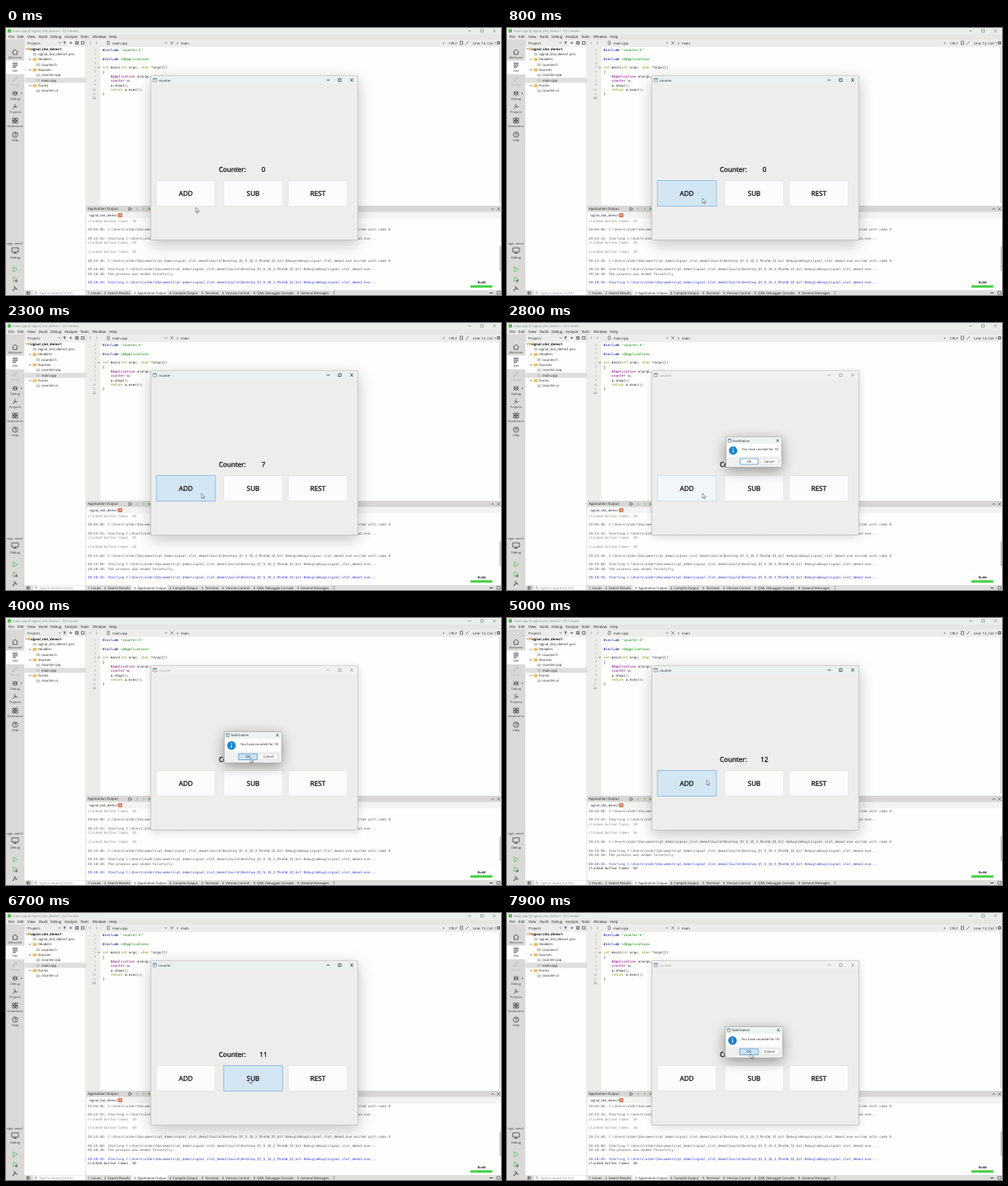
An HTML page with a canvas that plays this animation: 600 px wide and 323 px high, repeating every 8 s.

```html
<!DOCTYPE html>
<html>
<head>
<meta charset="utf-8">
<style>
html, body { margin: 0; width: 100%; height: 100%; overflow: hidden; }
canvas { display: block; }
</style>
</head>
<body>
<canvas id="stage" width="600" height="323"></canvas>
<script>
const g = document.getElementById('stage').getContext('2d');
const LOOP = 8000, LINE = 5.34;
const SANS = '"Open Sans", "Noto Sans", sans-serif';
const MONO = '"DejaVu Sans Mono", monospace';
const PAPER = '#fefefc';
g.textRendering = 'geometricPrecision';
g.lineJoin = 'round';

const clamp = v => Math.max(0, Math.min(1, v));
const smooth = v => v * v * (3 - 2 * v);
const mix = (a, b, k) => `rgb(${a.map((v, i) => Math.round(v + (b[i] - v) * k))})`;
const fade = (t, on, off) => clamp((t - on) / 150) - clamp((t - off) / 150);

function rect(x, y, w, h, fill, stroke) {
  if (fill) { g.fillStyle = fill; g.fillRect(x, y, w, h); }
  if (stroke) { g.lineWidth = .8; g.strokeStyle = stroke; g.strokeRect(x, y, w, h); }
}
// y is the vertical middle of the line of text
function text(s, x, y, size = 4.2, color = '#333', align = 'left', weight = '', family = SANS) {
  g.font = `${weight} ${size}px ${family}`;
  g.fillStyle = color;
  g.textAlign = align;
  g.fillText(s, x, y + size * .34);
}
// Large text with a slightly heavier stem
function label(s, x, y, align) {
  text(s, x, y, 8.1, '#111', align);
  g.strokeStyle = '#111';
  g.lineWidth = .3;
  g.strokeText(s, x, y + 8.1 * .34);
}
const code = (s, x, y, color) => text(s, x, y, 4.07, color, 'left', '', MONO);
function path(d, x, y, stroke, fill, width = .8) {
  g.save();
  g.translate(x, y);
  const p = new Path2D(d);
  if (fill) { g.fillStyle = fill; g.fill(p); }
  if (stroke) { g.strokeStyle = stroke; g.lineWidth = width; g.stroke(p); }
  g.restore();
}
const CROSS = 'M-1.8-1.8L1.8 1.8M1.8-1.8L-1.8 1.8';
const DOWN = 'M-1.2-.6L0 .6L1.2-.6';
const PLAY = 'M-2.2-3L2.8 0L-2.2 3Z';
function windowButtons(xs, y, color) {
  path('M-1.8 0H1.8', xs[0], y, color);
  path('M-1.6-1.6H1.6V1.6H-1.6Z', xs[1], y, color, null, .7);
  path(CROSS, xs[2], y, color, null, .7);
}

const modes = [
  ['Welcome', 29, 'M-3.5 0L0-3L3.5 0M-2.4-.5V3H2.4V-.5'],
  ['Edit', 45, 'M-3-2.5H3M-3-.8H3M-3 .9H3M-3 2.6H1'],
  ['Design', 62, 'M-3 3L-2 0L2-3L3-2L-1 2Z'],
  ['Debug', 79, 'M-1.5-1.5A1.8 1.8 0 0 1 1.5-1.5V1.5A1.8 1.8 0 0 1-1.5 1.5ZM-3.3 0H3.3M-3-2.5L-1.5-1M3-2.5L1.5-1M-3 2.5L-1.5 1M3 2.5L1.5 1'],
  ['Projects', 95, 'M-3 3L1-1M.5-3A2 2 0 1 0 3-.5'],
  ['Extensions', 112, 'M-3-3H-.5V-.5H-3ZM.5-3H3V-.5H.5ZM-3 .5H-.5V3H-3ZM.5 .5H3V3H.5Z'],
  ['Help', 129, 'M3.2 0A3.2 3.2 0 1 1-3.2 0A3.2 3.2 0 1 1 3.2 0M-1-.8A1 1 0 1 1 0 .3V.8M0 1.5V2']
];
const menu = [['File', 3], ['Edit', 14], ['View', 26], ['Build', 40], ['Debug', 54],
  ['Analyze', 71], ['Tools', 90], ['Window', 105], ['Help', 125]];
const tree = [['signal_slot_demo1.pro', 39], ['Headers', 39, 1], ['counter.h', 43], ['Sources', 39, 1],
  ['counter.cpp', 43], ['main.cpp', 43], ['Forms', 39, 1], ['counter.ui', 43]];
const panes = [['1  Issues', 99], ['2  Search Results', 119], ['3  Application Output', 155],
  ['4  Compile Output', 198], ['5  Terminal', 237], ['6  Version Control', 262],
  ['8  QML Debugger Console', 300], ['9  General Messages', 353]];
// line number, then [text, column, colour] pieces
const K = '#808000', P = '#800080', N = '#222', G = '#008000', D = '#000080';
const source = [
  [1, ['#include ', 0, D], ['"counter.h"', 9, G]],
  [3, ['#include ', 0, D], ['<QApplication>', 9, G]],
  [5, ['int', 0, K], ['main(', 4, N], ['int', 9, K], ['argc,', 13, N], ['char', 19, K], ['*argv[])', 24, N]],
  [6, ['{', 0, N]],
  [7, ['QApplication', 4, P], ['a(argc, argv);', 17, N]],
  [8, ['counter', 4, P], ['w;', 12, N]],
  [9, ['a.show();', 4, N]],
  [10, ['return', 4, K], ['a.exec();', 11, N]],
  [11, ['}', 0, N]]
];
const exe = 'C:\\Users\\alder\\Documents\\qt_demo\\signal_slot_demo1\\build\\Desktop_Qt_5_15_2_MinGW_32_bit-Debug\\debug\\signal_slot_demo1.exe';
const clicked = 'clicked button times  10';
const start = s => `${s}: Starting ${exe}...`;
const exit = s => `${s}: ${exe} exited with code 0`;
// [row, text, kind]
const log = [[0, clicked], [2, exit('20:04:56'), 1], [4, start('20:13:31'), 1], [5, clicked], [7, clicked],
  [9, exit('20:13:44'), 1], [11, start('20:15:04'), 1], [12, '20:18:10: The process was ended forcefully.', 1],
  [14, start('20:18:33'), 2], [15, clicked, 3]];
const logColors = ['#888', '#5c5c5c', '#3a3ad0', '#222'];

function drawTop() {
  rect(0, 0, 600, 7.5, '#e9eeea');
  rect(2, 1.5, 4, 4, '#58b858');
  text('main.cpp @ signal_slot_demo1 - Qt Creator', 8, 3.6, 4, '#888');
  windowButtons([562, 577, 592], 3.5, '#888');
  rect(0, 7.5, 600, 6.5, '#e6e6e3');
  menu.forEach(([s, x]) => text(s, x, 11, 4.3, '#222'));
  rect(22, 14, 578, 8.5, '#ececea');
  rect(22, 22, 578, .6, '#d6d6d4');
  text('Projects', 26, 18.3, 4.2);
  path(DOWN, 65, 18, '#555');
  path('M-1.8-1.5H1.8L.4 .2V1.8H-.4V.2Z', 71, 18, null, '#555');
  rect(75.3, 14.8, 6.4, 6.6, '#fff');
  path('M-2 0H2M-1-1H1M-1 1H1', 78.5, 18, '#555');
  path('M-1.6-1.6H1.6V1.6H-1.6ZM0-1.6V1.6', 86, 18, '#555');
  path('M-1.6-1.6H1.6V1.6H-1.6Z', 93, 18, '#555');
  path('M1-1.5L-.6 0L1 1.5', 102, 18, '#999');
  path('M-1-1.5L.6 0L-1 1.5', 110, 18, '#999');
  path('M-1.2-2H1.2V2H-1.2Z', 124, 18, '#777');
  text('main.cpp', 129, 18.3, 4.2, '#222');
  path(DOWN, 194, 18, '#555');
  path(CROSS, 201, 18, '#555', null, .6);
  text('#', 206.5, 18.3, 4.2, '#3a9a8a');
  text('main', 212, 18.3, 4.2, '#222');
  text('+', 529, 18.3, 5, '#444');
  text('CRLF', 537, 18.3, 4.2);
  path('M-1.5-2H1.5V2H-1.5Z', 552, 18, '#666');
  path('M-1.8 1.8L1.8-1.8', 559, 18, '#666');
  text('Line: 12, Col: 1', 566, 18.3, 4.2, '#222');
  path('M-1.5-1.5H1.5V1.5H-1.5ZM0-1.5V1.5', 597, 18, '#555');
}

function drawModes() {
  rect(0, 14, 22.5, 309, '#dad9d7');
  rect(0, 39.5, 22.5, 16.5, '#fff');
  modes.forEach(([s, y, d]) => {
    const c = s === 'Design' ? '#b8b8b6' : '#444';
    path(d, 11, y, c, null, .8);
    text(s, 11, y + 7.2, 3.8, c, 'center');
  });
  path('M0-1.2L1.5 0L0 1.2Z', 18, 79, null, '#555');
  text('sign...emo1', 11, 260.5, 3.7, '#333', 'center');
  path('M-4-3H4V2H-4ZM-2 3.5H2M0 2V3.5', 11, 269, '#444');
  text('Debug', 11, 277.3, 3.8, '#333', 'center');
  path(PLAY, 11, 292, '#5cc45c');
  path(PLAY, 11, 304, '#5cc45c');
  path('M-1.5 0A1.5 1.5 0 1 0 1.5 0A1.5 1.5 0 1 0-1.5 0', 12.5, 306, null, '#777');
  path('M-3 3L1-1M-1.5-2.5L2.5 1.5', 11, 315, '#666', null, 1.1);
}

function drawTree() {
  rect(22.5, 22.5, 74.5, 294.5, PAPER);
  rect(22.5, 60.2, 74.5, 6.2, '#dededc');
  path(DOWN, 24.8, 25.2, '#555');
  rect(26.5, 23.7, 2.4, 3, '#e0a848');
  text('signal_slot_demo1', 29.6, 25.2, 4.2, '#111', 'left', 'bold');
  tree.forEach(([s, x, folder], i) => {
    const y = 31.6 + 6.35 * i;
    if (folder) path(DOWN, 29, y, '#555');
    rect(x - 6.5, y - 1.6, 4.5, 3.4, folder ? '#e8bd62' : '#c4cec4');
    text(s, x, y, 4.2, '#222');
  });
  rect(96.6, 14, .8, 303, '#ccc');
}

function drawEditor() {
  rect(97.4, 22.6, 502.6, 192.4, PAPER);
  rect(97.4, 22.6, 17, 192.4, '#eeece9');
  for (let n = 1; n <= 12; n++) text(n, 109, 26.5 + LINE * (n - 1), 3.6, n > 11 ? '#555' : '#aaa', 'right', '', MONO);
  path(DOWN, 112.5, 47.8, '#555');
  source.forEach(([n, ...parts]) => parts.forEach(([s, col, c]) =>
    code(s, 117 + col * 2.45, 26.5 + LINE * (n - 1), c)));
  rect(598, 23, 1.4, 189, '#d4d4d2');
}

function drawOutput(t) {
  rect(97.4, 215, 502.6, 7.8, '#d8d7d5');
  rect(97.4, 222.8, 502.6, 7.7, '#f4f3f1');
  text('Application Output', 99, 219, 4.2, '#222');
  path('M-1.5-2L1.5 0L-1.5 2M-2-2V2', 151, 219, '#555');
  path('M1-1.5L-.6 0L1 1.5', 159, 219, '#999');
  path('M-1-1.5L.6 0L-1 1.5', 167, 219, '#999');
  path('M-1.3-1.8L1.8 0L-1.3 1.8Z', 174, 219, null, '#62b462');
  path('M-1.6 .8L0-.8L1.6 .8', 590, 219, '#555');
  path(CROSS, 597, 219, '#555', null, .6);
  rect(98, 222.8, 44, 7.7, '#fff');
  text('signal_slot_demo1', 101, 226.5, 4.1, '#222');
  rect(136, 224, 5, 5, '#d8704c');
  path('M-1.2-1.2L1.2 1.2M1.2-1.2L-1.2 1.2', 138.5, 226.5, '#fff', null, .7);
  rect(97.4, 230.5, 502.6, 86.5, PAPER);

  const later = t >= 4100;
  g.save();
  g.beginPath();
  g.rect(97, 230.5, 503, 86.5);
  g.clip();
  log.forEach(([row, s, kind = 0]) => {
    if (kind === 3 && !later) return;
    code(s, 99, 233.2 + LINE * (row - (later ? 2 : 0)), logColors[kind]);
  });
  g.restore();
  rect(598.5, 264, 1.2, 30, '#b0b0b0');

  rect(560.5, 303.5, 31.5, 13.2, '#fff');
  text('Build', 576.5, 307.7, 3.8, '#222', 'center', 'bold');
  rect(563, 311.2, 26.5, 3, '#46d246');
}

function drawStatus() {
  rect(22.5, 317, 577.5, 6, '#dededc');
  rect(25, 319, 4, 3, null, '#666');
  rect(26, 319, 1.2, 3, '#555');
  rect(33, 317.6, 63, 5.4, '#fff');
  path('M1 1L2.2 2.2M1.2 0A1.2 1.2 0 1 1-1.2 0A1.2 1.2 0 1 1 1.2 0', 36, 320, '#888', null, .6);
  text('Type to locate (Ctrl+K)', 40, 320.6, 4, '#888');
  rect(152.5, 317, 43, 6, '#fff');
  panes.forEach(([s, x]) => text(s, x, 320.6, 4, '#222'));
  path('M-1-.6L0-1.6L1-.6M-1 .6L0 1.6L1 .6', 397.5, 320.3, '#444', null, .6);
  rect(586, 320, 4, 1, '#444');
  rect(595, 318.8, 4, 3.2, null, '#666');
}

function shadowRect(x, y, w, h, fill, alpha, blur, dy) {
  g.save();
  g.shadowColor = `rgba(0,0,0,${alpha})`;
  g.shadowBlur = blur;
  g.shadowOffsetY = dy;
  rect(x, y, w, h, fill);
  g.restore();
}

function button(name, x, hover) {
  rect(x, 184.5, 71.5, 31, mix([252, 252, 252], [211, 230, 244], hover),
    mix([226, 226, 226], [138, 184, 220], hover));
  label(name, x + 35.7, 200.2, 'center');
}

function drawCounter(t, count, active) {
  shadowRect(175.5, 57.8, 251, 198.7, '#ededec', active ? .24 : .15, active ? 18 : 10, active ? 5 : 2);
  rect(175.5, 57.8, 251, 198.7, null, '#c0c0be');
  rect(176, 58.2, 250, 10.3, active ? '#eaf0ee' : '#f1f1f0');
  const ink = active ? '#222' : '#999';
  rect(178.3, 61, 4, 4, '#fff', '#888');
  rect(178.3, 61, 4, 1.2, '#4a90c8');
  text('counter', 185, 63.2, 4, ink);
  windowButtons([390.5, 404.5, 419], 63, ink);
  label('Counter:', 258, 171, 'left');
  label(count, 312, 171.3, 'center');
  button('ADD', 182.3, fade(t, 600, 2690) + fade(t, 4420, 5470));
  button('SUB', 263.8, fade(t, 5560, 6850));
  button('REST', 342.2, 0);
}

function drawDialog(t, age) {
  const p = clamp(age / 200), s = .93 + .07 * p;
  g.save();
  g.globalAlpha = clamp(p * 2.5);
  g.translate(299.2, 156.3);
  g.scale(s, s);
  g.translate(-299.2, -156.3);
  shadowRect(264.5, 137.5, 69.5, 37.5, '#fff', .4, 16, 4);
  rect(264.5, 137.5, 69.5, 37.5, null, '#aaa');
  rect(265, 138, 68.5, 8, '#eef3f1');
  rect(267, 140, 3.6, 3.6, '#fff', '#888');
  rect(267, 140, 3.6, 1.1, '#4a90c8');
  text('Notification', 272.5, 142, 4, '#222');
  path('M-1.5-1.5L1.5 1.5M1.5-1.5L-1.5 1.5', 329, 141.8, '#222', null, .7);
  path('M5.2 0A5.2 5.2 0 1 1-5.2 0A5.2 5.2 0 1 1 5.2 0', 273.3, 154.3, null, '#1b84cf');
  path('M0-.8V2.8', 273.3, 154.3, '#fff', null, 1);
  rect(272.7, 151.3, 1.2, 1.2, '#fff');
  text('You have counted for 10!', 284, 152.3, 4, '#222');
  rect(265, 161.5, 68.5, 13, '#f0f0f0');
  const hover = fade(t, 3420, 4080) + fade(t, 7230, 9000);
  rect(282, 164.2, 22.5, 7.3, mix([253, 253, 253], [204, 228, 247], hover), '#5a9ccc');
  rect(307, 164.2, 22.5, 7.3, '#fdfdfd', '#dcdcdc');
  text('OK', 293.2, 168, 4.1, '#222', 'center');
  text('Cancel', 318.2, 168, 4.1, '#222', 'center');
  g.restore();
}

// [time, x, y] of the pointer tip
const track = [[0, 230, 217], [300, 230, 217], [800, 237, 206], [2900, 237, 206], [3550, 296, 169],
  [4080, 296, 169], [4600, 242, 196], [5300, 242, 196], [5900, 295, 200], [6950, 295, 200],
  [7400, 295, 170], [LOOP, 295, 170]];
function drawPointer(t) {
  const i = track.findIndex(k => k[0] > t);
  const a = track[i - 1], b = track[i], k = smooth((t - a[0]) / (b[0] - a[0]));
  path('M0 0V6L1.4 4.8L2.3 6.8L3.2 6.4L2.3 4.4H4.1Z',
    a[1] + (b[1] - a[1]) * k, a[2] + (b[2] - a[2]) * k, '#555', '#fff', .6);
}

const adds = [...Array.from({ length: 10 }, (_, i) => 1132 + 172 * i), 4750, 4950, 5130];
const subs = [6380, 6600, 6850];
const dialogs = [[2690, 4080], [6850, LOOP]];

function draw(t) {
  const past = list => list.filter(c => c <= t).length;
  const dialog = dialogs.find(([a, b]) => t >= a && t < b);
  g.clearRect(0, 0, 600, 323);
  drawTop();
  drawModes();
  drawTree();
  drawEditor();
  drawOutput(t);
  drawStatus();
  drawCounter(t, past(adds) - past(subs), !dialog);
  if (dialog) drawDialog(t, t - dialog[0]);
  drawPointer(t);
}

const begin = performance.now();
function tick() {
  draw((performance.now() - begin) % LOOP);
  requestAnimationFrame(tick);
}
tick();
</script>
</body>
</html>
```
